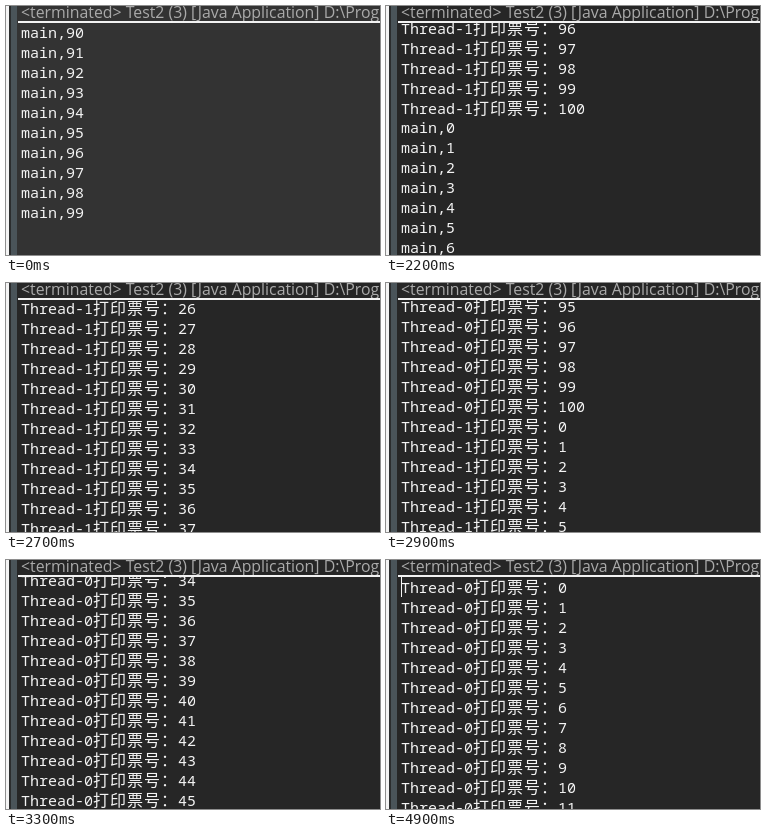
Write an HTML page that moves like this. It is 374 px wide and 249 px high and loops after 5.2 s.

```html
<!DOCTYPE html>
<html lang="zh-CN">
<head>
<meta charset="utf-8">
<style>
  html, body { margin: 0; width: 100%; height: 100%; overflow: hidden; background: #4a5459; }
  div { position: absolute; }
  #edge { left: 0; top: 0; width: 3px; height: 249px; background: #f4f4f4; border-right: 2px solid #2b2d2e; }
  #panel { left: 11px; top: 0; width: 363px; height: 249px; overflow: hidden; background: #333; }
  #panel.dim { background: #262626; }
  #title {
    left: 4px; top: 0; width: 359px; height: 15px; overflow: hidden; white-space: pre;
    color: #aaa; font: 15.85px/13px "Open Sans", "Noto Sans", sans-serif;
  }
  #rule { left: 1px; top: 15px; width: 362px; height: 2px; background: #f2f2f2; }
  #view { left: 0; top: 17px; width: 363px; height: 232px; overflow: hidden; }
  #log { left: 4px; top: -1px; color: #f4f4f4; white-space: pre; font: 15px/20px "Noto Sans Mono", monospace; }
  #log p { margin: 0; height: 20px; }
  #log span { font: 300 16px/20px "Noto Sans CJK SC", "Noto Sans CJK", sans-serif; letter-spacing: 1px; }
  #caret { left: 4px; top: 0; width: 1px; height: 20px; background: #f4f4f4; }
</style>
</head>
<body>
<div id="edge"></div>
<div id="panel">
  <div id="title">&lt;terminated&gt; Test2 (3) [Java Application] D:\Prog</div>
  <div id="rule"></div>
  <div id="view"><div id="log"></div><div id="caret"></div></div>
</div>
<script>
const LOOP = 5200, LINE = 20;
const [panel, log, caret] = ["panel", "log", "caret"].map(id => document.getElementById(id));

const count = (n, label) => Array.from({ length: n }, (_, i) => `<p>${label}${i}</p>`).join("");
const ticket = id => `Thread-${id}<span>打印票号：</span>`;
log.innerHTML = count(101, ticket(0)) + count(101, ticket(1)) + count(100, "main,");

// [time, first visible line]
const scroll = [[1800, 235.4], [2000, 210], [2100, 210], [2500, 159], [2900, 95.2],
                [3300, 34.35], [3400, 34.35], [3700, 0]];

function topLine(t) {
  if (t < 1800) return 292;
  const next = scroll.findIndex(([time]) => time > t);
  if (next < 0) return 0;
  const [t0, a] = scroll[next - 1], [t1, b] = scroll[next];
  return a + (b - a) * (t - t0) / (t1 - t0);
}

function draw(now) {
  const t = Math.floor(now % LOOP / 100) * 100;
  panel.className = t < 1800 ? "" : "dim";
  log.style.transform = `translateY(${-Math.round(topLine(t) * LINE)}px)`;
  caret.hidden = t < 3700 || (t >= 4200 && t < 4900);
  requestAnimationFrame(draw);
}
draw(performance.now());
</script>
</body>
</html>
```
